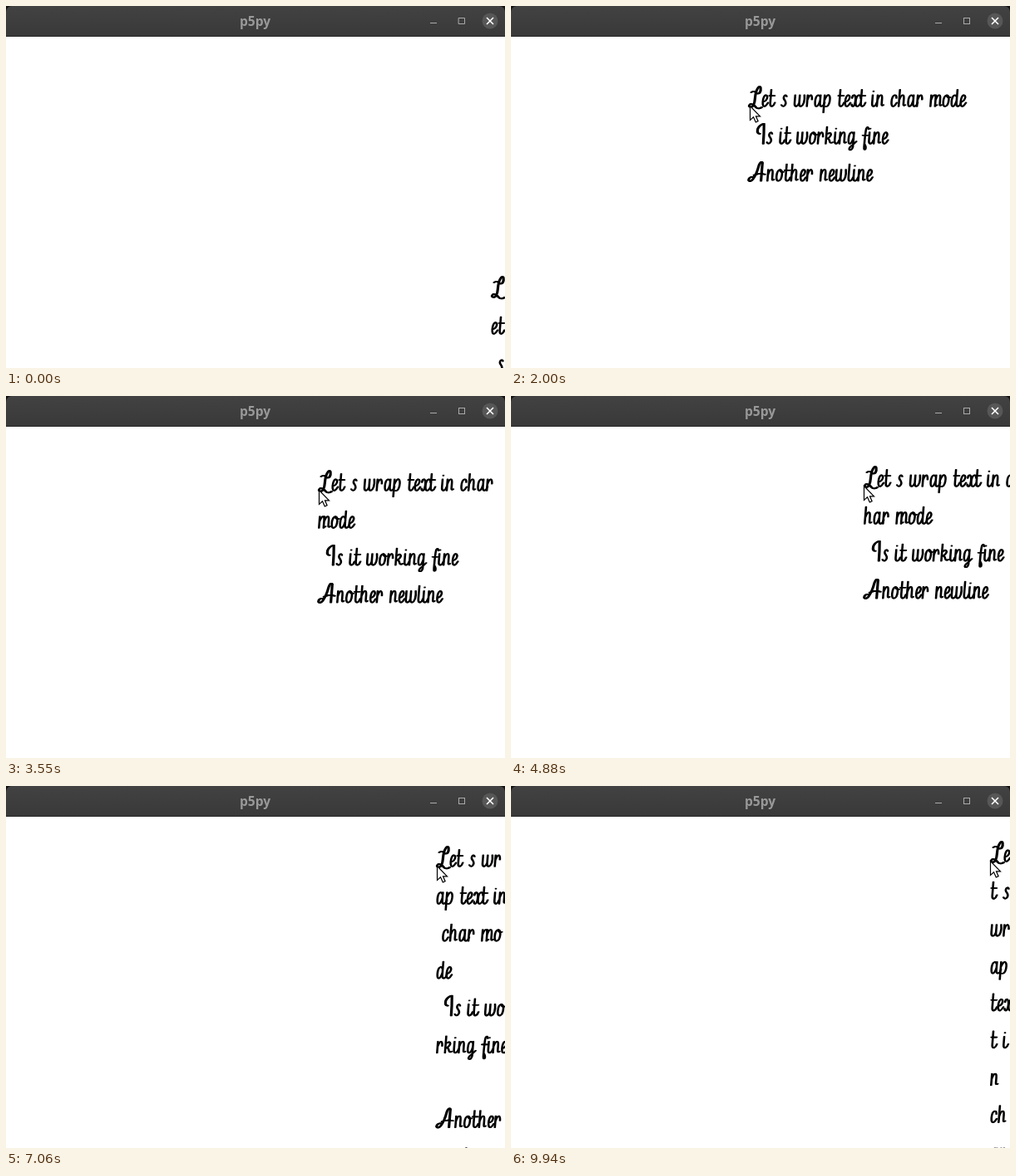
An HTML page with a canvas that plays this animation: 600x436 px, repeating every 10 s.

```html
<!DOCTYPE html>
<html lang="en">
<head>
<meta charset="utf-8">
<title>p5py</title>
<style>
html, body { margin: 0; width: 100%; height: 100%; overflow: hidden; background: #fff; }
canvas { display: block; }
</style>
</head>
<body>
<canvas id="stage" width="600" height="436" role="img"
  aria-label="Let s wrap text in char mode. Is it working fine. Another newline"></canvas>
<script>
const WIDTH = 600, HEIGHT = 436, BAR = 37, LOOP = 10000, LEADING = 44.9;
const SMALL = 0.92, SLANT = -0.08;
const MESSAGE = "Let's wrap text in char mode\n Is it working fine\nAnother newline";
const ctx = document.getElementById('stage').getContext('2d');

// Pen strokes shared by the lowercase letters; baseline at y = 0.
const strokes = {
  hook: 'M0-15V-4Q0 0 2.5 0Q5-1 6-5',
  rise: 'M0-22V-4Q0 0 2.5 0Q5-1 6-5',
  post: 'M0-15V0',
  pole: 'M0-22V0',
  arch: 'M0-8Q2-15 4-15Q6-15 6-10V-3Q6 0 8.5-2',
  shoulder: 'M0-8Q2-15 4-15Q6-14 6-9',
  bowl: 'M6.5-12Q5-15 3.5-15Q0-14 0-6Q0 0 2.5 0Q5-1 6.5-8',
  open: 'M6-11Q6-15 3.5-15Q0-14 0-6Q0 0 3 0Q5-1 7-5',
  bar: 'M-2-14H5',
  dot: 'M0-20V-19.6',
  up: 'M0-5Q1-10 0-15'
};

// Strokes that belong to one letter only.
const shapes = {
  e: 'M0-6Q5-7 5.5-12Q5-15 3-15Q0-13 0-6Q0 0 3 0Q5-1 7-5',
  o: 'M4-15Q0-14 0-6Q0 0 3 0Q7-1 7-9Q7-14 4-15Q4-11 9-12',
  s: 'M6-13Q5-16 3-14Q1-11 4-8Q7-4 4-1Q2 1 0-2',
  x: 'M0-11Q0-15 2.5-15Q5-13 4.5-7Q4-1 2 0Q0 0 0-3',
  k: 'M0-6Q5-8 6-12Q5-16 2-13M1-7Q4-7 5-3Q6 0 9-2',
  f: 'M5-19Q4-24 2-20Q1-16 1 4Q1 9 3 7Q4 4 1 0M-2-11H5',
  p: 'M0-15V8M0-8Q3-16 5-15Q8-13 7-6Q6 1 2 0',
  g: 'M0-15V4Q-1 9-4 8Q-6 6-1 2L4-3'
};

const capitals = {
  L: 'M1-17Q4-20 7-16Q11-14 12-19Q12-26 9-23Q6-19 6-9Q6 0 2 1Q-2 0 1-3Q5-3 8 1Q11 4 15 1',
  I: 'M3-12Q-1-12 0-18Q2-23 7-24Q8-12 8 0',
  A: 'M4-5Q-1-5-1-1Q1 2 4-2Q8-8 10-19Q12-25 14-22V0M5-7Q11-10 18-8'
};

const library = { ...strokes, ...shapes, ...capitals };

// Each letter: advance width, then strokes as name@offset.
const recipes = {
  a: '11 bowl hook@6.5', c: '9 open', d: '11 bowl rise@6.5', e: '8 e',
  f: '8 f@2', g: '10 bowl g@6.5', h: '11 pole arch', i: '6 hook dot@0.6',
  k: '10.5 pole k', l: '6 rise', m: '15 post arch post@6 arch@6',
  n: '10.5 post arch', o: '10 o', p: '10.5 p', r: '9.5 post shoulder',
  s: '9 s', t: '8 rise@1.2 bar@1.2', w: '15 hook hook@6 up@12', x: '9.8 x open@5',
  L: '16 L', I: '14.5 I@2', A: '22 A',
  ' ': '6.7', "'": '6.7', '\n': '8'
};

const glyphs = {};
for (const [char, recipe] of Object.entries(recipes)) {
  const [advance, ...parts] = recipe.split(' ');
  const scale = char in capitals ? 1 : SMALL;
  const nibs = char in capitals ? [0.8, 1.6, 2.4] : [0.8, 1.8];
  const path = new Path2D();
  for (const part of parts) {
    const [name, offset = 0] = part.split('@');
    path.addPath(new Path2D(library[name]), new DOMMatrix([scale, 0, 0, scale, offset * scale, 0]));
  }
  glyphs[char] = { advance: +advance, path, nibs };
}

// Pointer route: time, x, y.
const route = [
  [210, 583, 349], [420, 410, 190], [620, 260, 104], [760, 200, 101],
  [1000, 162, 117], [1180, 162, 117], [2000, 285, 120], [2180, 304, 116],
  [3210, 358, 113], [3550, 375, 113], [4270, 397, 108], [4880, 424, 108],
  [5300, 431, 105], [5790, 453, 102], [6330, 480, 102], [7060, 517, 96],
  [7360, 528, 95], [8390, 563, 90], [9120, 575, 90], [9700, 575, 90],
  [9940, 576, 90]
];

function pointerAt(time) {
  const next = route.findIndex(stop => stop[0] > time);
  if (next === 0) return route[0].slice(1);
  if (next < 0) return route[route.length - 1].slice(1);
  const [t0, x0, y0] = route[next - 1], [t1, x1, y1] = route[next];
  const k = (time - t0) / (t1 - t0);
  return [Math.round(x0 + (x1 - x0) * k), Math.round(y0 + (y1 - y0) * k)];
}

function wrap(text, width) {
  const limit = width + Math.min(6, 1 + width * 0.042);
  const lines = [''];
  let used = 0;
  const breakLine = () => { lines.push(''); used = 0; };
  for (const char of text) {
    const { advance } = glyphs[char];
    if (used && used + advance > limit) {
      breakLine();
      if (char === ' ' && width < 40) continue;
    }
    if (char === '\n') { breakLine(); continue; }
    lines[lines.length - 1] += char;
    used += advance;
  }
  return lines;
}

function drawLine(line, x, baseline) {
  for (const char of line) {
    const { advance, path, nibs } = glyphs[char];
    for (const nib of nibs) {
      ctx.setTransform(1, 0, SLANT, 1, x + nib, baseline);
      ctx.stroke(path);
    }
    x += advance;
  }
  ctx.resetTransform();
}

function drawText(x, y) {
  ctx.strokeStyle = '#000';
  ctx.lineWidth = 1.6;
  ctx.lineCap = ctx.lineJoin = 'round';
  wrap(MESSAGE, WIDTH - x).forEach((line, row) => {
    const baseline = y + 1 + row * LEADING;
    if (baseline < HEIGHT + 30) drawLine(line, x, baseline);
  });
}

const arrow = new Path2D('M0 0V17L4 13.3L6.8 19.4L9.6 18.2L7 12.3H12Z');
function drawCursor(x, y) {
  ctx.setTransform(1, 0, 0, 1, x + 0.5, y + 0.5);
  ctx.lineJoin = 'miter';
  ctx.lineWidth = 1.2;
  ctx.fillStyle = '#fff';
  ctx.fill(arrow);
  ctx.stroke(arrow);
  ctx.resetTransform();
}

function drawTitleBar() {
  ctx.fillStyle = '#111';
  ctx.fillRect(0, 0, WIDTH, 8);
  const shade = ctx.createLinearGradient(0, 0, 0, BAR);
  shade.addColorStop(0, '#424242');
  shade.addColorStop(1, '#393939');
  ctx.fillStyle = shade;
  ctx.beginPath();
  ctx.roundRect(0, 0, WIDTH, BAR, [7, 7, 0, 0]);
  ctx.fill();
  ctx.fillStyle = '#262626';
  ctx.fillRect(0, BAR - 1, WIDTH, 1);

  ctx.fillStyle = '#999';
  ctx.font = 'bold 15.5px "Noto Sans", "Open Sans", sans-serif';
  ctx.textAlign = 'center';
  ctx.fillText('p5py', 299.5, 23.5);

  ctx.fillStyle = '#aaa';
  ctx.fillRect(510, 20, 8, 1);
  ctx.strokeStyle = '#aaa';
  ctx.lineWidth = 1;
  ctx.strokeRect(544.5, 14.5, 7, 7);

  ctx.fillStyle = '#575757';
  ctx.beginPath();
  ctx.arc(582, 18, 9.5, 0, Math.PI * 2);
  ctx.fill();
  ctx.strokeStyle = '#fff';
  ctx.lineWidth = 1.6;
  ctx.lineCap = 'butt';
  ctx.stroke(new Path2D('M578 14L586 22M586 14L578 22'));
}

function draw(time) {
  ctx.fillStyle = '#fff';
  ctx.fillRect(0, 0, WIDTH, HEIGHT);
  drawText(...pointerAt(time));
  if (time >= 210) drawCursor(...pointerAt(time + 20));
  drawTitleBar();
}

const start = performance.now();
function tick() {
  draw((performance.now() - start) % LOOP);
  requestAnimationFrame(tick);
}
tick();
</script>
</body>
</html>
```
